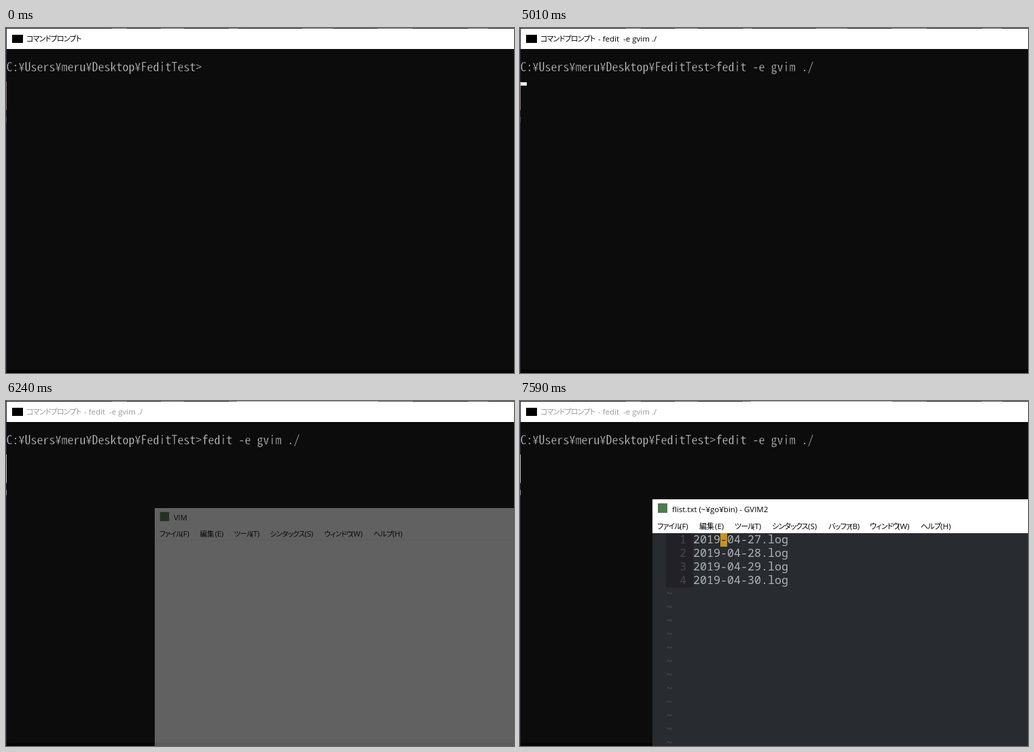
An HTML page that plays this animation: 748x509 px, repeating every 8 s.

```html
<!DOCTYPE html>
<html lang="ja">
<head>
<meta charset="utf-8">
<title>Terminal and editor</title>
<style>
  html, body { margin: 0; width: 100%; height: 100%; overflow: hidden; background: #0c0c0c; }
  svg { display: block; width: 748px; height: 509px; }
  text { white-space: pre; }
  .ui { font: 11.5px "Open Sans", "Noto Sans", sans-serif; }
  .kana { font: 11px "Noto Sans CJK JP", "Noto Sans CJK", sans-serif; font-feature-settings: "palt"; letter-spacing: -.8px; }
  .cmd { font-family: "Noto Sans Mono CJK JP", "Noto Sans Mono", monospace; stroke: #0c0c0c; stroke-width: .4px; }
  .code { font-family: "Noto Sans Mono", "DejaVu Sans Mono", monospace; }
</style>
</head>
<body>
<svg id="stage" viewBox="0 0 748 509"></svg>
<script>
const LOOP = 8000, CELL = 9;
const PROMPT = "C:¥Users¥meru¥Desktop¥FeditTest>";
const COMMAND = "fedit -e gvim ./";
const KEYS = [580, 610, 870, 970, 1070, 1660, 1890, 1990, 2090, 2530, 2830, 2910, 3000, 3080, 4170, 4260];
const BLINKS = [120, 650, 1160, 1700, 2230, 2740, 3270, 3810, 4340, 4850, 5370, 5900];
const ENTER = 4960, RETITLE = 5010, BLUR = 6140;
const OPEN = 6165, STEP = 37.5, STEPS = 8, LOADED_STEP = 4;

const stage = document.getElementById("stage");
const pen = document.createElement("canvas").getContext("2d");

function add(parent, tag, attrs, content) {
  const node = document.createElementNS("http://www.w3.org/2000/svg", tag);
  for (const key in attrs) node.setAttribute(key, attrs[key]);
  if (content !== undefined) node.textContent = content;
  parent.appendChild(node);
  return node;
}
const group = parent => add(parent, "g", {});
const box = (parent, x, y, width, height, fill) => add(parent, "rect", { x, y, width, height, fill });
const label = (parent, x, y, cls, fill, content) => add(parent, "text", { x, y, class: cls, fill }, content);
const show = (node, on) => node.setAttribute("visibility", on ? "visible" : "hidden");

// Font size at which one monospaced character is as wide as a cell
function sizeFor(node, cell) {
  pen.font = "100px " + getComputedStyle(node).fontFamily;
  return 100 * cell / pen.measureText("0").width;
}

// Console window
box(stage, 0, 0, 748, 509, "#0c0c0c");
box(stage, 0, 0, 748, 1, "#24202f");
for (const [x, w] of [[156, 22], [228, 34], [328, 14], [436, 46], [547, 52], [680, 30]])
  box(stage, x, 0, w, 1, "#67606c");
box(stage, 0, 1, 1, 508, "#29263a");
box(stage, 0, 79, 1, 42, "#8a7880");
box(stage, 0, 131, 1, 8, "#55505f");
box(stage, 1, 504, 747, 5, "#050406");
box(stage, 1, 1, 747, 30, "#fff");
box(stage, 9, 10, 16, 12, "#000");

// The frame lets more light through once the console loses focus
const glow = group(stage);
box(glow, 340, 0, 208, 1, "#a9a4ad");
box(glow, 0, 79, 1, 42, "#c4c0c6");
box(glow, 0, 131, 1, 8, "#98949e");

const caption = group(stage);
label(caption, 30, 20, "kana", "currentFill", "コマンドプロンプト").removeAttribute("fill");
const running = label(caption, 115, 20, "ui", "currentFill", "- fedit  -e gvim ./");
running.removeAttribute("fill");
const line = label(stage, 0.5, 64, "cmd", "#ccc", PROMPT);
line.setAttribute("font-size", sizeFor(line, CELL));
const caret = box(stage, 0, 62, CELL, 5, "#f2f2f2");

// Editor window, in its own coordinates
const editor = group(stage);
box(editor, 0, 0, 1334, 722, "#fff");
box(editor, 8, 6, 14, 14, "#4f7a50");

function menu(parent, items) {
  for (const [x, name, keyX, key] of items) {
    const word = label(parent, x, 44, "kana", "#000", name);
    if (name === "編集") word.style.letterSpacing = "0";
    label(parent, keyX, 44, "ui", "#000", `(${key})`);
  }
}
menu(editor, [[7, "ファイル", 40, "F"], [69, "編集", 92, "E"], [121, "ツール", 147, "T"], [176, "シンタックス", 229, "S"]]);

const empty = group(editor);
label(empty, 29, 19, "ui", "#000", "VIM");
menu(empty, [[259, "ウィンドウ", 300, "W"], [334, "ヘルプ", 363, "H"]]);
box(empty, 0, 49, 1334, 1, "#f0f0f0");

const loaded = group(editor);
label(loaded, 29, 19, "ui", "#000", "flist.txt (~¥go¥bin) - GVIM2");
menu(loaded, [[259, "バッファ", 291, "B"], [320, "ウィンドウ", 361, "W"], [395, "ヘルプ", 424, "H"]]);
box(loaded, 0, 50, 1334, 672, "#282b30");
box(loaded, 20, 50, 40, 80, "#222127");
const mark = box(loaded, 100, 50, 10, 20, "#c8921f");
const dash = label(loaded, 100, 65, "code", "#282b30", "-");
loaded.setAttribute("font-size", sizeFor(dash, 10));
for (let row = 0; row < 16; row++) {
  const y = 65 + 20 * row;
  if (row < 4) {
    label(loaded, 40, y, "code", "#474751", String(row + 1));
    label(loaded, 60, y, "code", "#adb5b5", `2019-04-${27 + row}.log`);
  } else {
    label(loaded, 20, y, "code", "#4a4e56", "~");
  }
}
loaded.appendChild(dash);

// A key always lights the caret, a blink flips it
const caretMarks = [...KEYS, ENTER].map(at => ({ at, key: true }))
  .concat(BLINKS.map(at => ({ at, key: false })))
  .sort((a, b) => a.at - b.at);

function caretOn(t) {
  let on = false;
  for (const m of caretMarks) if (m.at <= t) on = m.key || !on;
  return on && t < BLUR;
}

function drawConsole(t) {
  const typed = KEYS.filter(at => at <= t).length;
  line.textContent = PROMPT + COMMAND.slice(0, typed);
  const entered = t >= ENTER;
  caret.setAttribute("x", entered ? 1 : 1 + CELL * (PROMPT.length + typed));
  caret.setAttribute("y", entered ? 80 : 62);
  show(caret, caretOn(t));
  show(running, t >= RETITLE);
  show(glow, t >= BLUR);
  caption.setAttribute("fill", t >= BLUR ? "#999" : "#000");
}

// The editor fades in while growing about its centre, in even steps
function drawEditor(t) {
  const step = Math.min(STEPS, Math.max(0, Math.floor((t - OPEN) / STEP)));
  const left = 1 - step / STEPS;
  const shrink = 0.0575 * Math.pow(left, 1.63);
  editor.setAttribute("opacity", 1 - Math.pow(left, 1.5));
  editor.setAttribute("transform",
    `translate(${195 + 667 * shrink} ${145 + 361 * shrink}) scale(${1 - shrink})`);
  show(editor, step > 0);
  const ready = step >= LOADED_STEP;
  empty.setAttribute("display", ready ? "none" : "inline");
  loaded.setAttribute("display", ready ? "inline" : "none");
  const row = t < 7440 ? 2 : t < 7590 ? 1 : 0;
  mark.setAttribute("y", 50 + 20 * row);
  dash.setAttribute("y", 65 + 20 * row);
}

function frame(now) {
  const t = now % LOOP;
  drawConsole(t);
  drawEditor(t);
  requestAnimationFrame(frame);
}
frame(0);
</script>
</body>
</html>
```
